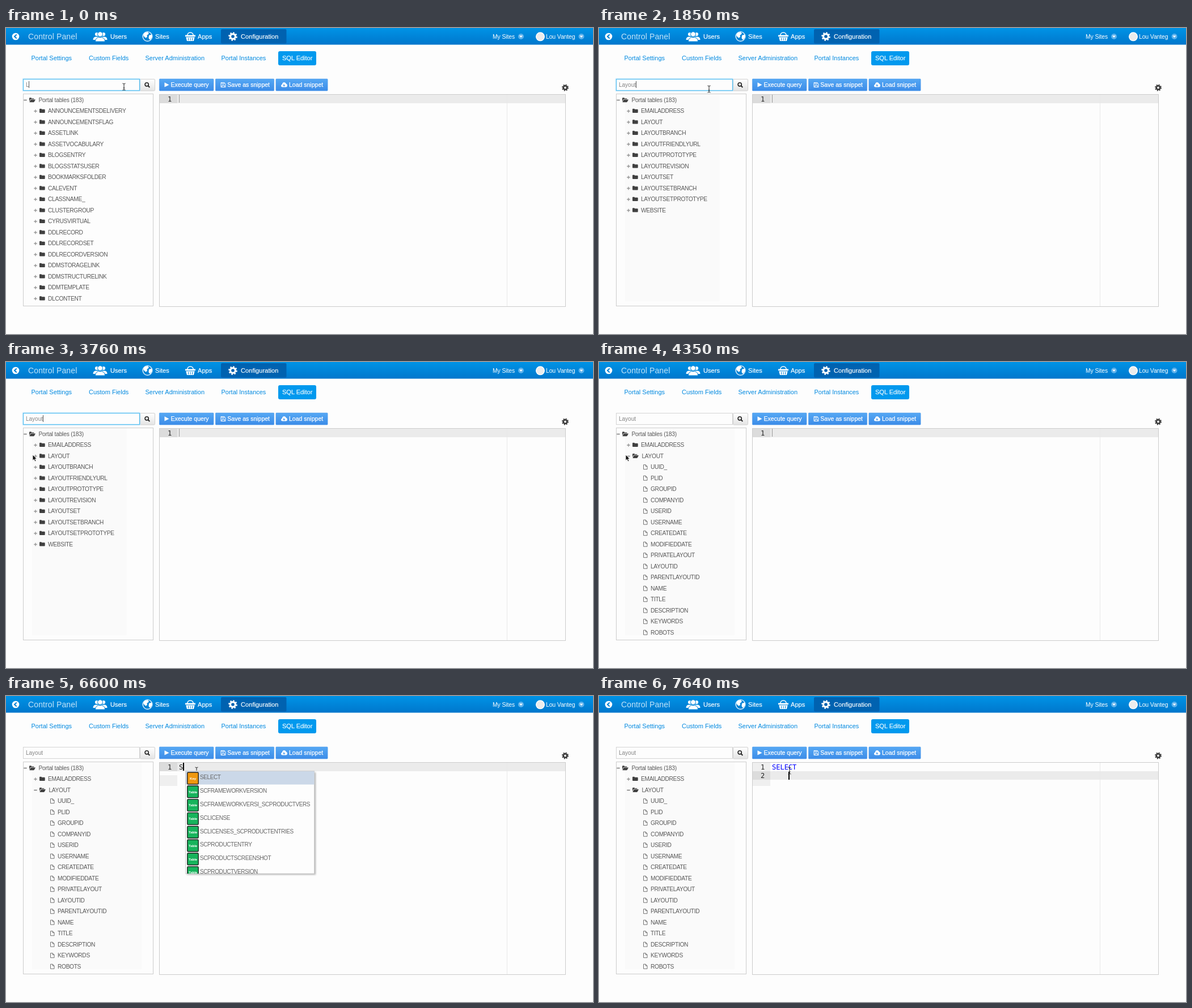
Write an HTML page that moves like this. It is 1035x541 px and loops after 8 s.

```html
<!DOCTYPE html>
<html lang="en">
<head>
<meta charset="utf-8">
<title>SQL Editor</title>
<style>
html, body { margin: 0; width: 100%; height: 100%; overflow: hidden; background: #fdfdfd; }
svg { display: block; width: 1035px; height: 541px; }
text { font-family: "Liberation Sans", Arial, sans-serif; white-space: pre; }
.crisp { shape-rendering: crispEdges; }
.title { font-size: 14px; letter-spacing: .12px; fill: #c4e4f9; }
.nav text { font-size: 11px; letter-spacing: .08px; fill: #fff; stroke: #fff; stroke-width: .2px; }
.user text { font-size: 10.4px; letter-spacing: -.1px; fill: #fff; }
.tabs text { font-size: 11px; fill: #0089e0; }
.tabs .on { fill: #fff; stroke: #fff; stroke-width: .15px; }
.btn text { font-size: 10.5px; fill: #fff; stroke: #fff; stroke-width: .25px; }
.tree text { font-size: 10.2px; letter-spacing: -.32px; fill: #585858; }
.tree .root { letter-spacing: -.2px; }
.input { font-size: 10px; fill: #858585; }
.code text { font-family: "DejaVu Sans Mono", monospace; font-size: 12px; fill: #222; }
.code .kw { fill: #00f; }
.popup text { font-size: 10px; letter-spacing: -.4px; fill: #666; }
.popup .tag { font-size: 6px; font-weight: bold; letter-spacing: 0; fill: #fff; }
</style>
</head>
<body>
<svg viewBox="0 0 1035 541" xmlns="http://www.w3.org/2000/svg">
<defs>
  <linearGradient id="bar" x2="0" y2="1"><stop stop-color="#0093e6"/><stop offset="1" stop-color="#0077cc"/></linearGradient>
  <linearGradient id="blue" x2="0" y2="1"><stop stop-color="#55a8f4"/><stop offset="1" stop-color="#3c8ce8"/></linearGradient>
  <linearGradient id="grey" x2="0" y2="1"><stop stop-color="#fff"/><stop offset="1" stop-color="#e4e4e4"/></linearGradient>
  <clipPath id="listClip"><rect x="317" y="133" width="227" height="181"/></clipPath>
  <filter id="soft" x="-10%" y="-30%" width="120%" height="160%"><feGaussianBlur stdDeviation="1.5"/></filter>
  <path id="plus" d="M-2.7 0H2.7M0-2.7V2.7" stroke="#949494" stroke-width="1.3"/>
  <path id="minus" d="M-2.7 0H2.7" stroke="#777" stroke-width="1.5"/>
  <path id="folder" fill="#404040" d="M0-2.8Q0-3.7 1-3.7H3.1Q4-3.7 4-2.6H8.7Q9.7-2.6 9.7-1.6V2.7Q9.7 3.7 8.7 3.7H1Q0 3.7 0 2.7Z"/>
  <path id="open" fill="#404040" d="M0 2.6V-3Q0-4 1-4H3.2Q4-4 4-2.9H7.6Q8.6-2.9 8.6-1.6H3.2Q2.4-1.6 1.8-.8ZM.3 4L2.4-.2Q2.8-.8 3.4-.8H11L8.8 3.3Q8.4 4 7.7 4Z"/>
  <path id="file" fill="none" stroke="#666" stroke-width=".9" d="M.5-4H4.2L7-1.2V4H.5ZM4.2-4V-1.2H7"/>
  <g id="drop"><circle r="5" fill="#5eb2ec"/><path d="M-3-1.5H3L0 2Z" fill="#fff"/></g>
</defs>

<rect width="1035" height="541" fill="#fdfdfd"/>

<!-- top bar -->
<rect width="1035" height="29.5" fill="url(#bar)"/>
<rect x="379" y="2" width="115.5" height="25.5" rx="2" fill="#0062b0"/>
<circle cx="17" cy="15" r="6.3" fill="#fff"/>
<path d="M18.7 11.6L15 15L18.7 18.4" fill="none" stroke="#0080d4" stroke-width="2"/>
<text class="title" x="39" y="19.5">Control Panel</text>
<g class="nav">
  <g fill="#fff">
    <circle cx="160" cy="11" r="3.1"/><circle cx="172" cy="11" r="3.1"/>
    <path d="M153.5 21Q153.5 16 158 15.4H174Q178.5 16 178.5 21Z"/>
    <g stroke="#0085d9"><circle cx="166" cy="11" r="4.4"/><path d="M157.5 24Q157.5 17.5 163.5 16.5H168.5Q174.5 17.5 174.5 24Z"/></g>
  </g>
  <circle cx="249.5" cy="15" r="8.3" fill="#0b85d6" stroke="#fff" stroke-width="1.3"/>
  <path fill="#fff" d="M243 10Q246 7 250 7.3L252 10L248.5 13L249 16L246 17.5L242.5 14ZM252 13L257 11.5L257.5 16L254 21L251.5 18Z"/>
  <path fill="none" stroke="#fff" stroke-width="1.4" d="M319.5 14Q320 8 325 8Q330 8 330.5 14"/>
  <path fill="#fff" d="M316 12.5H334V15.3H316ZM317.3 16.3H332.7L331 23H319Z"/>
  <path stroke="#0080d4" d="M321.5 17.5V22M325 17.5V22M328.5 17.5V22"/>
  <circle cx="400" cy="15" r="4.4" fill="none" stroke="#fff" stroke-width="3.2"/>
  <circle cx="400" cy="15" r="6.6" fill="none" stroke="#fff" stroke-width="2.4" stroke-dasharray="2.6 2.58"/>
  <text x="184" y="19">Users</text><text x="263" y="19">Sites</text>
  <text x="338" y="19">Apps</text><text x="414" y="19">Configuration</text>
</g>
<g class="user">
  <text x="858" y="19">My Sites</text>
  <use href="#drop" x="908" y="15"/>
  <circle cx="942" cy="15.3" r="7.3" fill="#ececec" stroke="#fff" stroke-width="1.4"/>
  <text x="952" y="19">Lou Vanteg</text>
  <use href="#drop" x="1014.5" y="15"/>
</g>

<g class="tabs">
  <rect x="480" y="41" width="67" height="25" rx="3" fill="#0099ee"/>
  <text x="44.5" y="57">Portal Settings</text><text x="146" y="57">Custom Fields</text>
  <text x="245.5" y="57">Server Administration</text><text x="379.5" y="57">Portal Instances</text>
  <text class="on" x="487" y="57">SQL Editor</text>
</g>

<!-- search field -->
<rect x="236.5" y="90.5" width="26" height="20.5" rx="1.5" fill="url(#grey)" stroke="#d0d0d0"/>
<circle cx="248.2" cy="99.8" r="3.1" fill="none" stroke="#222" stroke-width="1.6"/>
<path d="M250.5 102.1L253.3 105" stroke="#222" stroke-width="2"/>
<rect x="30.5" y="90.5" width="205" height="20" fill="#fdfdfd" stroke="#d4d4d4"/>
<g id="focus">
  <rect x="30" y="90" width="206" height="21" rx="1" fill="none" stroke="#a5daf8" stroke-width="3" opacity=".45"/>
  <rect x="30.5" y="90.5" width="205" height="20" fill="none" stroke="#4dbcf0"/>
</g>
<text class="input" id="query" x="35" y="104"></text>
<rect class="crisp" id="caret" y="94" width="1" height="12" fill="#555"/>

<!-- tables -->
<g class="tree">
  <rect class="crisp" x="30.5" y="116.5" width="229" height="375" fill="#fdfdfd" stroke="#ccc"/>
  <rect id="shade" x="46" y="117" height="366" fill="#fafafa"/>
  <use href="#minus" x="34" y="127.5"/><use href="#open" x="41" y="127.3"/>
  <text class="root" x="57.5" y="131">Portal tables (183)</text>
  <g id="all"></g><g id="found"></g><g id="fields"></g>
  <rect class="crisp" id="underline" x="74" y="171" width="39" height="1" fill="#555"/>
</g>

<!-- toolbar -->
<g class="btn">
  <g fill="url(#blue)" stroke="#4a97e8" stroke-width=".6">
    <rect x="270.4" y="90" width="95.6" height="21" rx="1"/><rect x="369.4" y="90" width="103.2" height="21" rx="1"/>
    <rect x="475.9" y="90" width="91.2" height="21" rx="1"/>
  </g>
  <path d="M279.5 96.2L287.5 100.4L279.5 104.6Z" fill="#fff"/>
  <path d="M379 96.5H385L387 98.5V104.5H379ZM381 96.5V99H384.5V96.5M380.8 104.5V101.5H385.2V104.5" fill="none" stroke="#fff"/>
  <path d="M487.5 104.5Q485 104.5 485 102Q485 100 487 99.5Q487.3 96 490.5 96Q493 96 493.8 98.6Q496 99 496 101.8Q496 104.5 493.3 104.5Z" fill="#fff"/>
  <path d="M490.5 99V101H492.5L490.3 103.4L488 101H489.5V99Z" fill="#4a9aee"/>
  <text x="290.5" y="104">Execute query</text><text x="390.3" y="104">Save as snippet</text><text x="499" y="104">Load snippet</text>
</g>
<circle cx="986" cy="105.5" r="3.2" fill="none" stroke="#3a3a3a" stroke-width="2.6"/>
<circle cx="986" cy="105.5" r="5" fill="none" stroke="#3a3a3a" stroke-width="2" stroke-dasharray="2 1.927"/>

<!-- editor -->
<g class="code">
  <g class="crisp">
    <rect x="270.5" y="117.5" width="716" height="375" fill="#fdfdfd" stroke="#ccc"/>
    <rect id="gutter" x="271" width="31" fill="#efefef"/>
    <rect id="line" x="302" width="684" height="15" fill="#ebebeb"/>
    <rect id="mark" x="271" width="31" height="15" fill="#dcdcdc"/>
    <rect x="883" y="118" width="1" height="374" fill="#e8e8e8"/>
  </g>
  <text x="285" y="129.5">1</text><text id="two" x="285" y="144.5">2</text>
  <text id="sql" x="305" y="129.5"></text>
  <rect class="crisp" id="bar2" height="14"/>
</g>

<g id="cursor">
  <path id="beam" d="M-2.5-6Q0-6 0-4.5Q0-6 2.5-6M0-4.5V4.5M-2.5 6Q0 6 0 4.5Q0 6 2.5 6M-1.3 2H1.3" fill="none" stroke="#222"/>
  <path id="arrow" d="M0 0V10.2L2.4 8L4.1 11.8L6 11L4.3 7.3H7.3Z" fill="#111" stroke="#fff" stroke-width=".8"/>
  <path id="hand" d="M-2.6-5.3Q-1.6-6.8-.6-5.3V-1.4Q.6-2 1.2-1Q2.4-1.5 3-.4Q4.6-.8 5 .8V3.5L3.9 7H-1.3Q-2.4 4.4-3.8 2.2Q-4.4.6-3.3.4L-2.2 1.6Z" fill="#fff" stroke="#111"/>
</g>

<g class="popup" id="popup">
  <rect x="319" y="135" width="227" height="181" fill="#777" opacity=".55" filter="url(#soft)"/>
  <rect x="316.5" y="132.5" width="227" height="181.5" fill="#fdfdfd" stroke="#cfcfcf"/>
  <rect x="317" y="133" width="226.5" height="23.5" fill="#cbd8e8"/>
  <g id="items" clip-path="url(#listClip)"></g>
</g>
</svg>

<script>
const $ = id => document.getElementById(id);
const show = (id, on) => $(id).style.display = on ? '' : 'none';
const set = (id, attrs) => { for (const k in attrs) $(id).setAttribute(k, attrs[k]); };
const use = (ref, x, y) => `<use href="#${ref}" x="${x}" y="${y}"/>`;
const label = (s, x, y) => `<text x="${x}" y="${y}">${s}</text>`;
const rowY = i => 146.7 + 19.5 * i;

const table = (s, i) => use('plus', 52, rowY(i) + .3) + use('folder', 59, rowY(i) - .3) + label(s, 74, rowY(i) + 3.6);
const field = (s, i) => use('file', 78, rowY(i + 2)) + label(s, 91, rowY(i + 2) + 3.6);

$('all').innerHTML = `ANNOUNCEMENTSDELIVERY ANNOUNCEMENTSFLAG ASSETLINK ASSETVOCABULARY BLOGSENTRY
BLOGSSTATSUSER BOOKMARKSFOLDER CALEVENT CLASSNAME_ CLUSTERGROUP CYRUSVIRTUAL DDLRECORD DDLRECORDSET
DDLRECORDVERSION DDMSTORAGELINK DDMSTRUCTURELINK DDMTEMPLATE DLCONTENT`.split(/\s+/).map(table).join('');

$('found').innerHTML = `EMAILADDRESS LAYOUT LAYOUTBRANCH LAYOUTFRIENDLYURL LAYOUTPROTOTYPE LAYOUTREVISION
LAYOUTSET LAYOUTSETBRANCH LAYOUTSETPROTOTYPE WEBSITE`.split(/\s+/).map(table).join('');

$('fields').innerHTML = table('EMAILADDRESS', 0) +
  use('minus', 52, rowY(1) + .3) + use('open', 59, rowY(1) - .3) + label('LAYOUT', 75.5, rowY(1) + 3.6) +
  `UUID_ PLID GROUPID COMPANYID USERID USERNAME CREATEDATE MODIFIEDDATE PRIVATELAYOUT LAYOUTID
PARENTLAYOUTID NAME TITLE DESCRIPTION KEYWORDS ROBOTS`.split(/\s+/).map(field).join('');

$('items').innerHTML = `SELECT SCFRAMEWORKVERSION SCFRAMEWORKVERSI_SCPRODUCTVERS SCLICENSE
SCLICENSES_SCPRODUCTENTRIES SCPRODUCTENTRY SCPRODUCTSCREENSHOT SCPRODUCTVERSION`.split(/\s+/).map((s, i) => {
  const y = 133 + 23.8 * i;
  return `<rect x="319.8" y="${y + 2}" width="19.4" height="21" rx="1.5" fill="${i ? '#17b45c' : '#f0980f'}" stroke="#222" stroke-width="1.4"/>
    <text class="tag" text-anchor="middle" x="329.6" y="${y + 14.8}">${i ? 'Table' : 'Key'}</text>` + label(s, 342, y + 14.4);
}).join('');

// [start, value...]: the last entry already started is in force
const at = (list, t) => list.filter(e => e[0] <= t).pop();

const typed = [[0, 'L'], [150, 'La'], [300, 'Lay'], [670, 'Layo'], [810, 'Layou'], [1700, 'Layout']];
const blink = [[0, 1], [1250, 0], [1700, 1], [2150, 0], [2590, 1], [3030, 0], [3470, 1], [4060, 0]];
const moves = [
  [0, 208, 104, 'beam'], [1850, 194, 108, 'beam'], [2000, 152, 129, 'arrow'], [2150, 106, 153, 'arrow'],
  [2300, 76, 166, 'hand'], [2440, 60, 171, 'hand'], [2590, 55, 173, 'hand'], [2740, 54, 173, 'hand'],
  [3030, 53, 173, 'hand'], [3180, 51, 172, 'hand'], [3330, 46, 167, 'arrow'], [3470, 45, 166, 'arrow'],
  [3620, 46, 165, 'arrow'], [3760, 47, 164, 'arrow'], [4950, 74, 162, 'arrow'], [5100, 196, 151, 'arrow'],
  [5240, 306, 147, 'beam'], [5390, 322, 140, 'beam'], [5540, 331, 135, 'beam'], [5680, 335, 133, 'beam'], [5820, 336, 132, 'beam']
];
// start, text, caret line, caret column
const code = [[0, '', 0, 0], [6600, 'S', 0, 1], [6750, 'SELECT', 0, 6], [6900, 'SELECT', 0, 7], [7190, 'SELECT', 1, 0], [7640, 'SELECT', 1, 4]];

function draw(t) {
  const query = $('query');
  query.textContent = at(typed, t)[1];
  set('caret', { x: Math.round(34.6 + query.getComputedTextLength()) });
  show('caret', at(blink, t)[1]);
  show('focus', t < 4060);

  show('all', t < 520);
  show('found', t >= 520 && t < 4200);
  show('fields', t >= 4200);
  show('shade', t >= 520);
  set('shade', { width: t < 4200 ? 167 : 193 });

  const [, x, y, kind] = at(moves, t);
  set('cursor', { transform: `translate(${x} ${y})` });
  for (const k of ['beam', 'arrow', 'hand']) show(k, k === kind);
  show('underline', kind === 'hand');

  const [, text, row, col] = at(code, t);
  const top = 118 + 15 * row;
  $('sql').textContent = text;
  set('sql', { class: text === 'SELECT' ? 'kw' : '' });
  set('line', { y: top });
  set('mark', { y: top });
  show('gutter', t >= 5240);
  set('gutter', { y: row ? 118 : 140, height: row ? 41 : 19 });
  show('two', row);
  const live = t >= 6300;
  set('bar2', { x: Math.round(305 + 7.22 * col), y: top + (row ? .5 : 0), width: live ? 2 : 1, fill: live ? '#000' : '#999' });
  show('popup', t >= 6600 && t < 6750);
}

const start = performance.now();
function tick() {
  draw((performance.now() - start) % 8000);
  requestAnimationFrame(tick);
}
tick();
</script>
</body>
</html>
```
